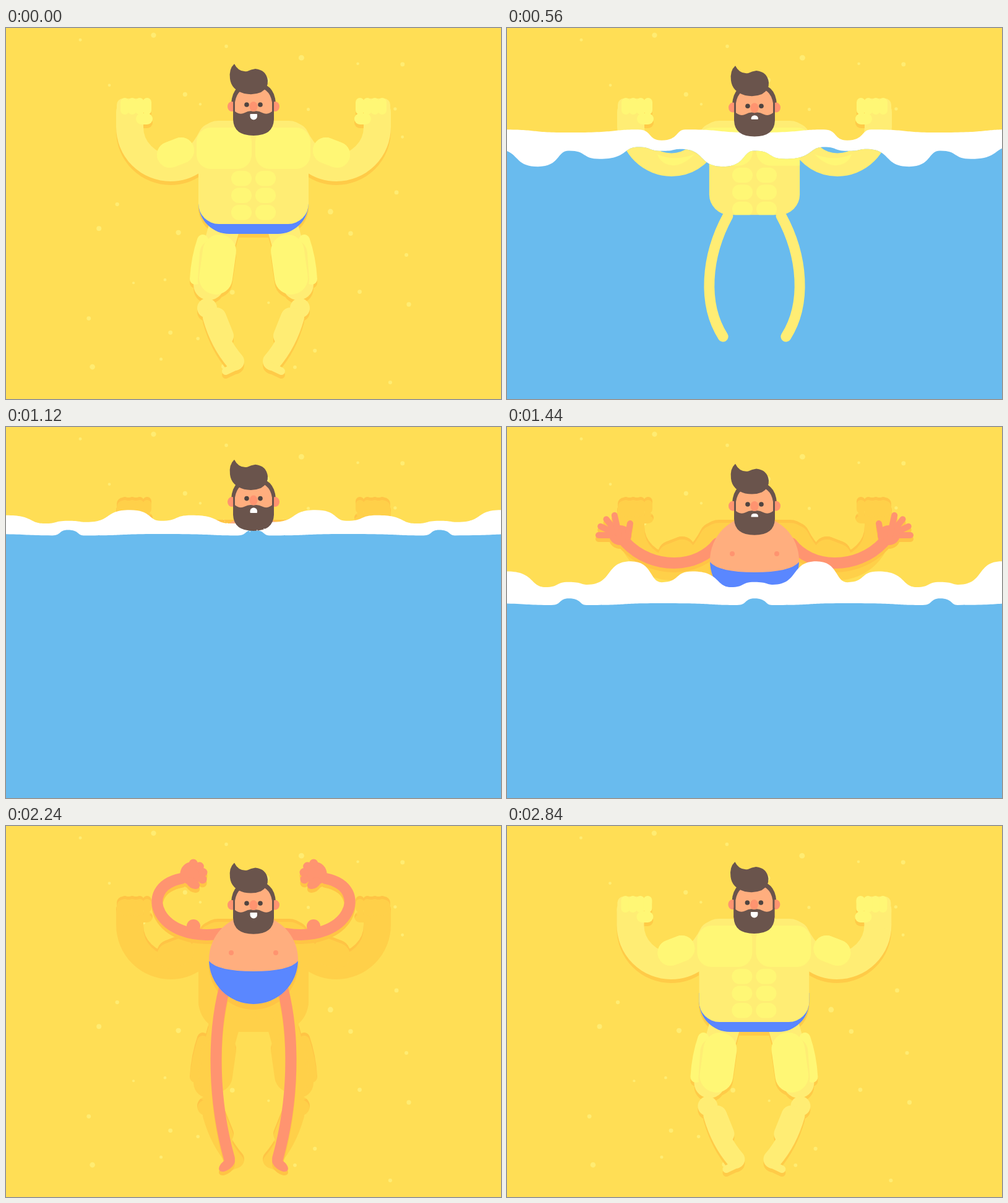
Animation of 800 by 600 pixels, one loop 2.88 s. Source, as an HTML page with a canvas:

```html
<!DOCTYPE html>
<html lang="en">
<head>
<meta charset="utf-8">
<title>Beach muscles</title>
<style>
  html, body { margin: 0; width: 100%; height: 100%; overflow: hidden; background: #ffde55; }
  canvas { display: block; width: 800px; height: 600px; }
</style>
</head>
<body>
<canvas id="stage" width="800" height="600"></canvas>
<script>
const W = 800, H = 600, LOOP = 2880, STEP = 40, PEAK = 775;
const C = {
  beach: '#ffde55', dot: '#ffec72', sand: '#ffed74', light: '#fff775', shade: '#ffcb48',
  pit: '#ffd049', pitShade: '#ffc445', skin: '#ffae7e', limb: '#ff9470', trunks: '#5a87ff',
  hair: '#6a544c', eye: '#4f4440', water: '#69bbee', foam: '#fff'
};
const stage = document.getElementById('stage').getContext('2d');
let ctx = stage;

const lerp = (a, b, k) => a + (b - a) * k;
const clamp = k => Math.min(1, Math.max(0, k));
const smooth = k => k * k * (3 - 2 * k);
const ramp = (t, from, to) => clamp((t - from) / (to - from));
const ease = (t, from, to) => smooth(ramp(t, from, to));

function seeded(seed) {
  return () => (seed = (seed * 16807) % 2147483647) / 2147483647;
}

// Rows are [time, values...]; eases between neighbouring rows.
function track(rows, t) {
  const i = rows.findIndex(row => row[0] > t);
  if (i === 0) return rows[0].slice(1);
  if (i < 0) return rows[rows.length - 1].slice(1);
  const [a, b] = [rows[i - 1], rows[i]], k = ease(t, a[0], b[0]);
  return a.slice(1).map((v, n) => lerp(v, b[n + 1], k));
}

function fill(d, color) { ctx.fillStyle = color; ctx.fill(new Path2D(d)); }
function stroke(d, color, width) {
  if (width <= 0) return;
  ctx.strokeStyle = color;
  ctx.lineWidth = width;
  ctx.lineCap = 'round';
  ctx.stroke(new Path2D(d));
}
const bar = (x0, y0, x1, y1, width, color) => stroke(`M${x0} ${y0}L${x1} ${y1}`, color, width);
function oval(x, y, rx, ry, color, turn = 0) {
  ctx.fillStyle = color;
  ctx.beginPath();
  ctx.ellipse(x, y, rx, ry, turn, 0, Math.PI * 2);
  ctx.fill();
}
const disc = (x, y, r, color) => oval(x, y, r, r, color);
function box(x, y, w, h, radius, color) {
  ctx.fillStyle = color;
  ctx.beginPath();
  ctx.roundRect(x, y, w, h, radius);
  ctx.fill();
}
function scoped(draw) { ctx.save(); draw(); ctx.restore(); }
function shifted(x, y, draw) { scoped(() => { ctx.translate(x, y); draw(); }); }
function mirrored(draw) {
  scoped(draw);
  scoped(() => { ctx.translate(W, 0); ctx.scale(-1, 1); draw(); });
}

function drawDots() {
  const random = seeded(77);
  for (let row = 0; row < 8; row++) for (let col = 0; col < 6; col++)
    disc(120 + 90 * (col + random()), 10 + 72 * (row + random()), 2 + 2.5 * random(), C.dot);
}

// --- Sand body -----------------------------------------------------------

const ARM = 'M200 136V160A66 66 0 0 0 266 226Q308 226 333 176';

function drawTorsoLights(light) {
  box(308, 161, 89, 67, 23, light);
  for (let row = 0; row < 3; row++) box(364, 231 + 27.5 * row, 33, 24.5, 12, light);
}

function drawSandLeg(sand, light) {
  bar(352, 325, 345, 350, 50, sand);
  bar(336, 360, 328, 415, 50, sand);
  stroke('M318 343Q308 372 306 406', light, 18);
  bar(336, 365, 333, 408, 46, sand);
  bar(345, 361, 339, 404, 54, light);
  disc(325, 453, 16, sand);
  bar(340, 468, 352, 498, 32, sand);
  stroke('M333 468Q345 510 370 539', sand, 30);
  bar(355, 555, 372, 547, 12, sand);
}

function drawSandArm(sand, light) {
  stroke(ARM, sand, 44);
  box(179, 114, 43, 52, 10, sand);
  bar(265, 205, 283, 198, 42, light);
  for (let i = 0; i < 4; i++) box(185 + 12 * i, 113, 14, 27, 7, light);
  box(210, 138, 27, 18, 9, light);
}

function drawSandMan(sand, light, trunks) {
  mirrored(() => drawSandLeg(sand, light));
  mirrored(() => drawSandArm(sand, light));
  box(311, 270, 178, 63, [0, 0, 50, 50], trunks);
  box(311, 150, 178, 167, [32, 32, 33, 33], sand);
  mirrored(() => {
    drawTorsoLights(light);
    bar(265, 205, 283, 198, 42, light);
  });
}
const drawSilhouette = color => drawSandMan(color, color, color);

// The hollow the body leaves: a dark rim shows along its upper edges.
const pit = document.createElement('canvas');
pit.width = W;
pit.height = H;
ctx = pit.getContext('2d');
drawSilhouette(C.pitShade);
ctx.globalCompositeOperation = 'source-atop';
shifted(0, 5, () => drawSilhouette(C.pit));
ctx = stage;

// --- Skinny man ----------------------------------------------------------

// [time, shoulder, control, control, wrist, hand turn]
const ARM_POSES = [
  [1080, 340, 188, 300, 225, 250, 270, 200, 290, 0],
  [1440, 340, 188, 310, 228, 236, 234, 191, 186, 0],
  [1800, 348, 175, 252, 183, 232, 105, 268, 50, 0],
  [2220, 348, 174, 245, 190, 210, 100, 283, 85, .78]
];

function drawOpenHand(color) {
  oval(-8, -11, 18, 16, color);
  for (let i = 0; i < 4; i++) {
    const angle = Math.PI + .45 * i;
    bar(-10, -11, -10 + 33 * Math.cos(angle), -11 + 33 * Math.sin(angle), 10, color);
  }
  bar(4, -8, 8, -30, 10, color);
}
function drawFist(color) {
  oval(6, -18, 18, 19, color);
  for (let i = 0; i < 4; i++) {
    const angle = -2.2 + .6 * i;
    disc(8 + 19 * Math.cos(angle), -16 + 19 * Math.sin(angle), 7, color);
  }
  oval(19, -8, 12, 8, color, -.2);
}

function drawSkinnyMan(t) {
  const [x0, y0, x1, y1, x2, y2, wristX, wristY, turn] = track(ARM_POSES, t);
  const bow = 13 * (1 - ease(t, 1800, 2200));
  const bump = 11 * ease(t, 2040, 2200);
  const drawLimbs = color => mirrored(() => {
    stroke(`M353 262C${333 - bow} 340 ${335 - bow} 445 361 538`, color, 18);
    oval(357, 548, 15, 8, color, -.65);
    stroke(`M${x0} ${y0}C${x1} ${y1} ${x2} ${y2} ${wristX} ${wristY}`, color, 18);
    disc(303, 162, bump, color);
    ctx.translate(wristX, wristY);
    ctx.rotate(turn);
    (t < 1600 ? drawOpenHand : drawFist)(color);
  });
  shifted(0, 6, () => drawLimbs(C.pitShade));
  disc(400, 225, 72, C.pitShade);
  drawLimbs(C.limb);
  scoped(() => {
    disc(400, 216, 72, C.skin);
    ctx.clip();
    fill('M327 217Q340 235 400 235Q460 235 473 217V290H327Z', C.trunks);
  });
  mirrored(() => disc(364, 205, 4, C.limb));
}

// --- Wave ----------------------------------------------------------------

// Turning points of one 300 px stretch: [x, height].
const DRIPS = [[130, .1], [200, 1], [250, .19], [300, .61], [362, 0], [400, .2]];
function ripple(size) {
  const half = 12 + 1.5 * size;
  return [[100, .28], [250 - half, 0], [250, 1], [250 + half, 0]];
}

function waterBelow(points, shift, base, size) {
  const path = new Path2D();
  let last = null;
  for (let start = -600; start <= 900; start += 300) for (const [px, h] of points) {
    const x = px + start + shift, y = base + h * size;
    if (last) {
      const dx = x - last.x, [leave, arrive] = h > last.h ? [.6, .6] : [.72, .4];
      path.bezierCurveTo(last.x + dx * leave, last.y, x - dx * arrive, y, x, y);
    } else path.moveTo(x, y);
    last = { x, y, h };
  }
  path.lineTo(1400, 700);
  path.lineTo(-700, 700);
  path.closePath();
  return path;
}

// Upper and lower edge of the foam; drips trail behind the smooth front.
function foamEdges(t) {
  const u = Math.abs(t - PEAK), rising = t < PEAK;
  const notch = (rising ? 22 : 11) * Math.sin(Math.PI * clamp(u / (rising ? 740 : 1160)));
  if (rising) return [
    waterBelow(ripple(notch), 0, 118 + 1e-3 * u * u, notch),
    waterBelow(DRIPS, -150, 134 + 1.266e-3 * u * u, .147 * u)
  ];
  return [
    waterBelow(DRIPS, 0, 118 + 3.19e-4 * u * u, -.0628 * u),
    waterBelow(ripple(notch), 150, 134 + 3.48e-4 * u * u, -notch)
  ];
}

function drawDissolving(t) {
  const melt = ramp(t, 420, 800), vanish = ramp(t, 800, 1020);
  const shrink = (from, to, gone) => lerp(lerp(from, to, melt), gone, vanish);
  mirrored(() => {
    bar(330, 345, 326, 408, 46 * (1 - ramp(t, 320, 520)), C.sand);
    const start = lerp(16, 60, vanish), end = shrink(275, 127, 66);
    ctx.setLineDash([end - start, 999]);
    ctx.lineDashOffset = -start;
    stroke('M365 290C315 370 311 472 372 526', melt < .8 ? C.sand : C.light, shrink(18, 15, 0));
  });
  mirrored(() => {
    ctx.translate(0, -13 * melt);
    stroke(ARM, C.sand, shrink(44, 26, 0));
    ctx.globalAlpha = 1 - ramp(t, 800, 900);
    fill('M243 209Q270 221 303 209Q285 227 268 227Q248 225 243 209Z', C.light);
  });
  const half = shrink(89, 46, 0), top = shrink(165, 178, 215), bottom = shrink(325, 263, 215);
  if (half > 0) scoped(() => {
    box(400 - half, top, half * 2, bottom - top, Math.min(33, half), C.sand);
    ctx.clip();
    ctx.translate(0, -14 * melt);
    mirrored(() => drawTorsoLights(C.light));
  });
}

function drawWave(t) {
  if (t < STEP || t > 2160) return;
  const [upper, lower] = foamEdges(t);
  ctx.fillStyle = C.foam;
  ctx.fill(upper);
  ctx.fillStyle = C.water;
  ctx.fill(lower);
  if (t < 1020) scoped(() => { ctx.clip(lower); drawDissolving(t); });
}

// --- Head ----------------------------------------------------------------

const NOD = [[0, 0], [320, 13], [800, -8.5], [1100, -8.5], [1440, 1], [2240, 1], [2480, 0]];

function drawHead(t) {
  const [face] = track(NOD, t);
  const skull = face * .7, quiff = face + .38 * Math.abs(face), low = skull - face;
  shifted(0, skull, () => {
    fill('M364 124V122Q366 88 400 88Q434 88 436 122V124Z', C.hair);
    mirrored(() => oval(365, 127, 7, 8, C.limb));
    box(367, 112, 66, 36, 0, C.hair);
    fill('M370 150V120Q374 95 400 95Q426 95 430 120V150Z', C.skin);
  });
  shifted(0, face, () => {
    fill(`M367 132Q376 142 386 137Q393 133 400 135Q407 133 414 137Q424 142 433 132
      V${148 + low}Q432 ${174 + low} 400 ${174 + low}Q368 ${174 + low} 367 ${148 + low}Z`, C.hair);
    oval(400, 127, 6.5, 8, C.limb);
    mirrored(() => disc(389, 124, 3.8, C.eye));
    const smiling = t < 120 || t > 2000;
    const gape = ramp(t, 480, 700) - ramp(t, 1150, 1400);
    if (smiling) box(394.5, 139, 11.5, 9.5, [1, 1, 6, 6], C.foam);
    else box(394.5, 139, 11.5, 5.5 + 3 * gape, [5.5, 5.5, 1, 1], C.foam);
  });
  shifted(0, quiff, () => fill('M369 58Q360 66 362 82Q364 100 385 106Q400 109 412 104Q424 97 423 85Q421 68 403 66Q396 67 390 70Q376 72 369 58Z', C.hair));
}

function drawNeckFoam(t) {
  const size = ease(t, 600, 760) - ease(t, 900, 1160), random = seeded(5);
  if (size <= 0) return;
  for (let i = 0; i < 14; i++) {
    const angle = Math.PI * i / 13, r = 5 + 7 * Math.sin(angle) + 3 * random();
    disc(400 + 48 * Math.cos(angle), 149 + 19 * Math.sin(angle) + 2 * Math.sin(t / 90 + i), r * size, C.foam);
  }
}

// --- Timeline ------------------------------------------------------------

function shake(t) {
  const strength = 6 * ramp(t, 2280, 2400) * Math.exp(Math.min(0, 2400 - t) / 190);
  return strength * Math.cos(Math.PI * (t - 2400) / STEP);
}

// Overshoots before it settles at full size.
function popScale(t) {
  const k = ramp(t, 2380, 2600) - 1;
  return .75 + .25 * (1 + 2.7 * k ** 3 + 1.7 * k ** 2);
}

function render(t) {
  const washedAway = t >= 920, regrown = t >= 2400;
  ctx.fillStyle = C.beach;
  ctx.fillRect(0, 0, W, H);
  shifted(shake(t), 0, () => {
    drawDots();
    if (washedAway && t < 2600) ctx.drawImage(pit, 0, 0);
    if (washedAway && !regrown) drawSkinnyMan(t);
    else scoped(() => {
      const scale = regrown ? popScale(t) : 1;
      ctx.translate(400, 230);
      ctx.scale(scale, scale);
      ctx.translate(-400, -230);
      shifted(0, 6, () => drawSilhouette(C.shade));
      drawSandMan(C.sand, C.light, C.trunks);
    });
    drawWave(t);
    drawHead(t);
    drawNeckFoam(t);
  });
}

function tick() {
  render(Math.floor(performance.now() % LOOP / STEP) * STEP);
  requestAnimationFrame(tick);
}
tick();
</script>
</body>
</html>
```
